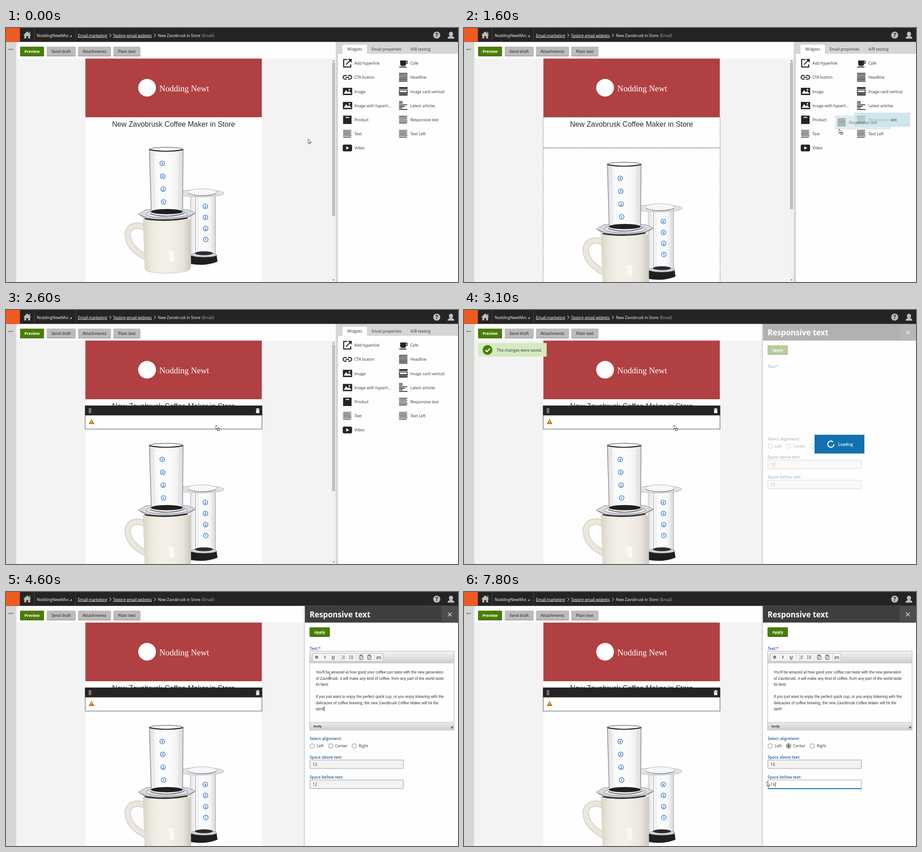
These frames come from a looping animation (998 px wide and 561 px high, 8 s). An HTML page:

```html
<!DOCTYPE html>
<html lang="en">
<head>
<meta charset="utf-8">
<title>Email builder</title>
<style>
html, body { margin: 0; width: 100%; height: 100%; overflow: hidden; background: #fff; }
svg { display: block; width: 998px; height: 561px; font-family: "Open Sans", "Noto Sans", sans-serif; }
text { white-space: pre; }
</style>
</head>
<body>
<svg id="stage" viewBox="0 0 998 561" xmlns="http://www.w3.org/2000/svg"></svg>
<script>
const LOOP = 8000, STEP = 100;
const INK = '#262423', GREEN = '#497d04', BLUE = '#1271b0', LABEL = '#1d5f96';
const PAPER = '#fefefe';
const ARIAL = "'Liberation Sans', Arial, sans-serif";
const SERIF = "'Liberation Serif', serif";

// Markup helpers
const attrs = o => Object.entries(o).map(([k, v]) => ` ${k}="${v}"`).join('');
const rect = (x, y, w, h, fill, more = {}) =>
  `<rect${attrs({ x, y, width: w, height: h, fill, ...more })}/>`;
const path = (d, fill = 'none', more = {}) => `<path${attrs({ d, fill, ...more })}/>`;
const line = (d, stroke, w = 1, more = {}) => path(d, 'none', { stroke, 'stroke-width': w, ...more });
const oval = (cx, cy, rx, ry, fill, more = {}) => `<ellipse${attrs({ cx, cy, rx, ry, fill, ...more })}/>`;
const text = (x, y, s, more = {}) =>
  `<text${attrs({ x, y, 'font-size': 8.6, fill: '#333', ...more })}>${s}</text>`;
const group = (id, ...parts) => `<g id="${id}">${parts.join('')}</g>`;
const MID = { 'text-anchor': 'middle' };
const SEMI = { 'font-weight': 600 };
const gradient = (id, stops, vertical) =>
  `<linearGradient id="${id}" x2="${vertical ? 0 : 1}" y2="${vertical ? 1 : 0}">` +
  stops.map((c, i) => `<stop offset="${i / (stops.length - 1)}" stop-color="${c}"/>`).join('') + '</linearGradient>';

const defs = '<defs>' +
  gradient('glass', ['#d3d5d8', '#f0f0f2', '#fafafa', '#fcfcfc', '#fbfbfb', '#fafafa', '#f6f6f7', '#eaebed', '#d6d8da']) +
  gradient('mug', ['#d9d4c8', '#ebe7dc', '#f2efe7', '#f3f0e9', '#f0ece4', '#e9e5db', '#cdc8bc']) +
  gradient('bar', ['#f3f3f3', '#cfcfcf'], true) +
  gradient('foot', ['#ebebeb', '#cfcfcf'], true) +
  gradient('shade', ['#dcdcdc00', '#b0b0b0']) + '</defs>';

function button(x, w, y, label, green) {
  return rect(x, y, w, 20.8, green ? '#335a00' : '#949393', { rx: 1.5 }) +
    rect(x, y, w, 19.4, green ? GREEN : '#bdbbbb', { rx: 1.5 }) +
    text(x + w / 2, y + 13.7, label, { ...MID, 'font-weight': green ? 700 : 600, fill: green ? '#fff' : '#403e3d', 'font-size': 8.5 });
}

function topBar() {
  const sep = x => rect(x, 0, 1, 30.7, '#4b4948');
  const chevron = x => line(`M${x} 12.5l3.5 3.7l-3.5 3.7`, '#b5b3b2', 1.2);
  const link = { fill: '#fff', 'text-decoration': 'underline' };
  return rect(0, 0, 998, 30.7, INK) + rect(0, 0, 30.7, 30.7, '#f05a22') + sep(62) + sep(153) +
    path('M46.8 7.5l8.7 8.2h-2.3v7.3h-4.3v-5h-4.2v5h-4.3v-7.3h-2.3zM51.5 8.5h2v4h-2z', '#bdbbbb') +
    text(68, 19.5, 'NoddingNewtMvc', { fill: '#fff', 'font-size': 8.5 }) + path('M145 15v4.5h-4.5z', '#bdbbbb') +
    text(158.7, 19.5, 'Email marketing', link) + chevron(228.5) +
    text(236.3, 19.5, 'Testing email widgets', link) + chevron(327) +
    text(335.5, 19.5, 'New Zavobrusk in Store', { fill: '#fff', 'font-size': 8.5 }) +
    text(432.5, 19.5, '(Email)', { fill: '#b5b3b2' }) +
    oval(951, 15.7, 7.8, 7.8, '#bdbbbb') +
    text(951, 20.2, '?', { ...MID, 'font-size': 12.5, 'font-weight': 700, fill: INK }) +
    oval(982.5, 13.3, 4.6, 5.3, '#bdbbbb') + path('M975 23.5q0-4.5 5-5.5h5q5 1 5 5.5z', '#bdbbbb');
}

function numbers(x0, y0, dx, dy) {
  return [4, 3, 2, 1].map((n, i) => {
    const x = x0 + dx * i, y = y0 + dy * i;
    return oval(x, y, 5.2, 5.2, '#f8fafd', { stroke: '#2d70bd', 'stroke-width': 1.3 }) +
      text(x, y + 2.7, n, { ...MID, 'font-size': 7.5, 'font-weight': 700, fill: '#2d70bd' });
  }).join('');
}

function photo() {
  const rim = { stroke: '#b0b3b8', 'stroke-width': 1 };
  const handle = 'M307 441C288 430 266 440 269 460C272 484 290 496 308 506';
  const smallPress = rect(406, 366, 57, 134, 'url(#glass)') +
    line('M418.5 372V494', '#8d9095', 1) + line('M424 372V494M457 372V494', '#d3d5d8', .9) + line('M462.5 370V500', '#9a9da2', 1) +
    path('M407 503L465 502L467 516Q440 527 407 521z', '#1f1f21') +
    oval(437, 501, 28, 5, '#d5d6d9', { stroke: '#8d9095' }) + oval(437, 497.5, 20, 4.2, '#2c2c2f') +
    oval(430, 365, 51.5, 8, '#e1e3e6', rim) + oval(433, 362.5, 32, 7.5, '#f7f7f8', rim) +
    line('M402 366Q432 375 464 366', '#85888d', 1.3) + line('M383 369Q430 378 478 368', '#c3c5c9', 1.2) +
    numbers(440, 394, .4, 24.4);
  const mug = line(handle, '#bfb9ac', 13.5) + line(handle, '#ebe7dd', 11.5) +
    path('M302 422H408L408.5 520Q409 533 399 537Q355 546 315 538Q307 535 306 525z', 'url(#mug)') +
    line('M306 527Q307 535 315 538Q355 546 399 537Q408 534 408.5 522', '#c9c3b6', 1.2) +
    path('M358 491h13v25h-9z', '#faf8f5');
  const flange = path('M292 411L310 401H400L419 409L398 421Q356 427 313 424z', '#dadbdf', { stroke: '#85878c' }) +
    oval(355, 411, 46, 8.5, '#e6e7ea', { stroke: '#77797e' }) + line('M296 413L313 420Q355 426 398 418L416 410', '#6d6f74', 1.2) +
    line('M306 421Q355 429 401 419.5', '#232326', 2.6);
  const chamber = path('M316 268L320.5 405H390L391.5 268z', 'url(#glass)') +
    line('M316.5 268L320.5 403M391 268L390 403', '#6f7176', 1.1) +
    line('M325 274L328 400M383 274L382 400', '#d6d8da', 1) +
    oval(355, 405.5, 35, 5.8, '#1f1f22') + line('M318 410Q355 422 394 409', '#55575c', 1.5) +
    oval(353.8, 268, 37.4, 4.6, '#f6f6f6', { stroke: '#3c3d40' }) + line('M316.5 268.5Q353 276 391 268.5', '#1f1f21', 2.2);
  return smallPress + mug + flange + chamber + numbers(345, 299.2, 1, 28.3);
}

const email = () =>
  rect(22, 30.7, 706, 37, PAPER) + rect(22, 67.5, 706, 494, '#f3f3f3') + rect(0, 30.7, 22, 531, '#d5d7d5') + rect(22, 30.7, 2, 531, '#e9eae9') +
  [7, 10.5, 14].map(x => rect(x - 1, 46.3, 1.9, 1.9, '#333')).join('') +
  rect(175.3, 67.5, 389.5, 494, PAPER) + rect(175.3, 67.5, 389.5, 129.6, '#b04042') +
  oval(311.5, 132, 19.6, 19.6, '#fff') +
  text(338.5, 139.5, 'Nodding Newt', { 'font-family': SERIF, 'font-size': 18.6, fill: '#fff' }) +
  text(370, 218, 'New Zavobrusk Coffee Maker in Store', { ...MID, 'font-family': ARIAL, 'font-size': 16.05, fill: '#2d2d2d' }) +
  group('photo', photo()) +
  rect(720, 67.5, 8, 494, '#f1f1f1') + path('M721 73.5l2.3-2.5l2.3 2.5z', '#555') + path('M721 555.5h4.6l-2.3 2.5z', '#555') +
  '<rect id="thumb" x="720" y="76" width="6.6" fill="#bfbfbf"/>' +
  button(31, 53, 41.6, 'Preview', true) + button(90, 63.5, 41.6, 'Send draft') +
  button(159, 72.5, 41.6, 'Attachments') + button(237, 59.5, 41.6, 'Plain text');

// Widget icons, drawn around a centre
const rows = (x, y, lens, step, w) =>
  line(lens.map((l, i) => `M${x - 9.5} ${y - (lens.length - 1) * step / 2 + i * step}h${l}`).join(''), INK, w);
const icons = {
  link: (x, y) => line(`M${x} ${y - 8}h-8.2v16.5h15.5v-6`, INK, 2.3) + line(`M${x - 3} ${y + 3}l9-9`, INK, 2.3) + path(`M${x + 1} ${y - 9.5}h8.5v8.5z`, INK),
  cta: (x, y) => line(`M${x - 1.5} ${y - 4}h-4a4 4 0 0 0 0 8h4M${x + 1.5} ${y - 4}h4a4 4 0 0 1 0 8h-4M${x - 4} ${y}h8`, INK, 2.2),
  image: (x, y) => rect(x - 10, y - 8, 20.5, 16, INK) +
    path(`M${x - 8} ${y + 5}l5-8l4 5l3-3l5 6z`, '#fff') + oval(x + 4.5, y - 3.8, 1.8, 1.8, '#fff'),
  product: (x, y) => rect(x - 9.5, y - 9, 18.7, 18.5, INK) + rect(x - 4, y - 6, 8, 2, '#fff'),
  text: (x, y) => rows(x, y, [18.5, 17, 18.5, 17, 18.5, 18.5, 17], 2.65, 1.2),
  video: (x, y) => rect(x - 10.3, y - 7.5, 20.6, 15, INK, { rx: 3 }) + path(`M${x - 2.5} ${y - 3.7}l6.5 3.7l-6.5 3.7z`, '#fff'),
  cafe: (x, y) => path(`M${x - 7} ${y - 6}h13v7q0 5-4 5h-5q-4 0-4-5zM${x - 9} ${y + 7.5}h16v2h-16z`, INK) + line(`M${x + 5} ${y - 4.5}h3.5v5h-3.5`, INK, 1.6),
  headline: (x, y) => rows(x, y, Array(7).fill(18.5), 2.9, 1.7),
  card: (x, y) => rect(x - 9.5, y - 9.5, 18.8, 4, INK) + rect(x - 8.7, y - 3.2, 17.2, 7, '#fff', { stroke: INK, 'stroke-width': 1.6 }) + rect(x - 9.5, y + 2, 18.8, 7, INK) + rect(x - 9.5, y + 5, 18.8, 1, '#fff'),
  articles: (x, y) => rows(x, y, [8, 8, 18, 12, 8, 18.5], 3.4, 1.8),
};

const widgets = [
  ['link', 'Add hyperlink', 'cafe', 'Cafe'], ['cta', 'CTA button', 'headline', 'Headline'],
  ['image', 'Image', 'card', 'Image card vertical'], ['image', 'Image with hyperli...', 'articles', 'Latest articles'],
  ['product', 'Product', 'text', 'Responsive text'], ['text', 'Text', 'text', 'Text Left'], ['video', 'Video'],
];
const widget = (x, y, icon, label) => icon ? icons[icon](x, y) + text(x + 15.4, y + 3.4, label) : '';

const sidePanel = () =>
  rect(728, 30.7, 5, 531, '#d5d7d5') + rect(733, 30.7, 265, 531, PAPER) + rect(733, 30.7, 265, 26.3, '#d5d7d5') +
  rect(743, 37, 54, 20, PAPER) + text(770, 50.3, 'Widgets', { ...MID, 'font-size': 8.8 }) +
  text(807.5, 50.3, 'Email properties') + text(893, 50.3, 'A/B testing', { 'font-size': 8.8 }) +
  rect(862, 187, 123, 31, '#cfe6ec', { id: 'hover' }) +
  widgets.map(([a, b, c, d], i) => widget(753.8, 77.7 + i * 31.2, a, b) + widget(877.3, 77.7 + i * 31.2, c, d)).join('');

const dashed = (y, h) => rect(174.8, y, 390.6, h, 'none', { stroke: '#7a7a7a', 'stroke-dasharray': '2.6 1.5' });

const dropped = () =>
  rect(174.9, 211.5, 390.3, 51.5, PAPER, { stroke: '#333', 'stroke-width': .9 }) + rect(174.5, 211, 391.1, 21.7, INK) +
  [0, 1, 2, 3].map(i => rect(183, 217.3 + i * 2.8, 1.7, 1.7, '#fff') + rect(186, 217.3 + i * 2.8, 1.7, 1.7, '#fff')).join('') +
  path('M551.7 218.3h2.5v-1.5h3.2v1.5h2.5v1.4h-8.2zM552.3 220.4h7v7.3h-7z', '#fff') +
  path('M189 240l6.3 12h-12.6z', '#c87511') + rect(188.4, 244, 1.3, 4, '#fff') + rect(188.4, 249, 1.3, 1.4, '#fff');

const toast = () => rect(31, 73, 151.5, 30, '#d5eac0') + oval(52, 88.2, 10.7, 10.7, GREEN) +
  line('M47 88.5l3.6 3.6l6.6-7', '#fff', 2.4) + text(72.5, 91.7, 'The changes were saved.');

const copy = [
  "You'll be amazed at how good your coffee can taste with the new generation",
  'of Zavobrusk. It will make any kind of coffee, from any part of the world taste',
  'its best.', '',
  'If you just want to enjoy the perfect quick cup, or you enjoy tinkering with the',
  'delicacies of coffee brewing, the new ZavoBrusk Coffee Maker will hit the', 'spot!',
];

function editorTools() {
  const letter = (x, s, more) => text(x, 147.3, s, { ...MID, 'font-size': 9, 'font-family': ARIAL, 'font-weight': 700, ...more });
  const list = x => line(`M${x} 141.5h4.5M${x} 144.3h4.5M${x} 147h4.5`, '#444', 1);
  const clip = x => rect(x - 3.8, 139.7, 7.6, 9, 'none', { stroke: '#444', rx: .8 }) + rect(x - 2, 138.5, 4, 2.2, '#444') +
    rect(x - .8, 143, 5, 5.5, '#fff', { stroke: '#444', 'stroke-width': .9 });
  return rect(676.5, 135.5, 156, 17.5, '#f4f4f4', { stroke: '#b5b5b5', rx: 1.5 }) +
    letter(686, 'B') + letter(704, 'I', { 'font-style': 'italic', 'font-family': SERIF }) + letter(722.5, 'U', { 'text-decoration': 'underline' }) +
    [733, 773, 813].map(x => rect(x, 138, .8, 12.5, '#c4c4c4')).join('') +
    text(739.8, 143, '1', { 'font-size': 4.5 }) + text(739.8, 148.5, '2', { 'font-size': 4.5 }) + list(743.5) +
    rect(758, 140.5, 2.2, 2.2, '#444') + rect(758, 145.5, 2.2, 2.2, '#444') + list(762) +
    clip(784) + clip(802) + letter(823, '{#}', { 'font-size': 8 });
}

const editor = () => rect(670.5, 130.5, 319, 174.5, PAPER, { stroke: '#b6b6b6' }) +
  rect(671, 131, 318, 26, 'url(#bar)') + rect(671, 156.5, 318, .8, '#b6b6b6') +
  rect(671, 288, 318, 17, 'url(#foot)') + rect(671, 287.5, 318, .8, '#b6b6b6') + path('M987 295v6h-6z', '#666') +
  group('tools', editorTools()) +
  group('copy', copy.map((s, i) => text(684, 180.3 + i * 13.5, s, { 'font-family': ARIAL, 'font-size': 8.4 })).join(''),
    text(679, 299, 'body', { 'font-family': ARIAL, 'font-size': 7.5, 'font-weight': 700 })) +
  rect(702, 253, 1, 10, '#000', { id: 'caret' });

const label = (y, s) => text(670.5, y, s, { ...SEMI, fill: LABEL });
const radio = (x, s) => oval(x, 340, 4.9, 4.9, '#fff', { stroke: '#8e8e8e', 'stroke-width': 1.1 }) + text(x + 10, 343.3, s);
const field = (i, y) => group('field' + i,
  rect(671, y, 206.5, 18.8, '#f2f2f2', { class: 'box', stroke: '#bdbbbb', 'stroke-width': 1.6, rx: 1 }),
  rect(671, y + 18, 206.8, 2, BLUE, { class: 'focus' }), rect(677, y + 4, 10.3, 11.5, '#2f7fd6', { class: 'selection' }),
  text(677, y + 13, '12', { class: 'value' }), rect(687.5, y + 4.5, .9, 10.5, '#111', { class: 'caret' }));

const form = () => rect(655, 30.7, 5, 531, 'url(#shade)', { opacity: .6 }) + rect(660, 30.7, 338, 531, PAPER) +
  rect(660, 30.7, 338, 36.8, '#3f3d3d') + rect(961.5, 30.7, 36.5, 36.8, '#4d4b4b') +
  text(670.3, 56.3, 'Responsive text', { 'font-weight': 700, 'font-size': 17, fill: '#fff' }) +
  line('M975.8 45.3l8.4 8.4m0-8.4l-8.4 8.4', '#d8d8d8', 1.5) +
  button(670.5, 44.5, 78.1, 'Apply', true) + label(128.2, 'Text:<tspan fill="#c8202f">*</tspan>') +
  group('editor', editor()) +
  group('fields', label(327.2, 'Select alignment:'), radio(676, 'Left'), radio(716.8, 'Center'), radio(769, 'Right'),
    group('checked', oval(716.8, 340, 2.9, 2.9, GREEN), oval(716.8, 340, 5, 5, 'none', { id: 'ring', 'stroke-width': 1.3 })),
    label(367.7, 'Space above text:'), field(1, 371), label(411.8, 'Space bellow text:'), field(2, 415.3)) +
  group('loading', rect(660, 30.7, 338, 531, '#fff', { opacity: .6 }), rect(774, 275.5, 110, 41.5, BLUE),
    `<g id="spinner">${line('M4.8 -4.8A6.8 6.8 0 1 0 6.8 0', '#fff', 2.3)}</g>`,
    text(826, 299.8, 'Loading', { ...SEMI, fill: '#fff' }));

const arrow = path('M0 0V10L2.3 7.8L3.8 11.2L5.2 10.6L3.8 7.3H7z', '#fff', { stroke: '#222', 'stroke-width': .8 });
const cursors = group('cursor',
  group('arrow', arrow),
  group('dragging', arrow, rect(3, 8, 5.2, 4, '#fff', { stroke: '#222', 'stroke-width': .9 })),
  group('denied', oval(0, 0, 4, 4, '#fff', { stroke: '#000', 'stroke-width': 1.5 }), line('M-2.8 -2.8L2.8 2.8', '#000', 1.5)),
  group('beam', line('M-1.6 -4.5h3.2M0 -4.5V4.5M-1.6 4.5h3.2', '#333', .8)));

const stage = document.getElementById('stage');
stage.innerHTML = defs + email() +
  group('zones', dashed(197, 67.3), dashed(265.3, 310)) + group('dropped', dropped()) + sidePanel() +
  `<g id="ghost" opacity=".68">${rect(0, 0, 123, 31, '#cfe6ec')}${widget(15.3, 15.2, 'text', 'Responsive text')}</g>` +
  group('form', form()) + group('toast', toast()) + topBar() + cursors;

const $ = id => document.getElementById(id);
const show = (id, on) => $(id).setAttribute('display', on ? 'inline' : 'none');
const move = (id, x, y) => $(id).setAttribute('transform', `translate(${x} ${y})`);
const between = (v, a, b) => v >= a && v < b;
const ramp = (t, a, b) => Math.min(1, Math.max(0, (t - a) / (b - a)));
const ease = p => p * p * (3 - 2 * p);

// Pointer route: time, x, y, eased
const route = [
  [0, 667, 245], [400, 667, 245], [1000, 871, 216, 1], [1400, 871, 216], [1600, 828, 223], [2100, 594, 247],
  [2300, 500, 253], [2500, 463.5, 254], [3700, 463.5, 254], [4300, 715, 185, 1], [5400, 715, 185], [6300, 725, 346, 1],
  [6600, 698, 380], [6700, 695, 381], [6900, 669, 381], [7000, 669, 381], [7200, 688, 418], [7500, 688, 418], [7700, 669, 419], [8000, 669, 419],
];
function pointer(t) {
  const i = route.findIndex(k => k[0] > t);
  const [t0, x0, y0] = route[i - 1], [t1, x1, y1, soft] = route[i];
  const p = ramp(t, t0, t1), q = soft ? ease(p) : p;
  return [x0 + (x1 - x0) * q, y0 + (y1 - y0) * q];
}

function setField(i, value, focus, selected) {
  const part = c => $('field' + i).querySelector('.' + c);
  const vis = (c, on) => part(c).setAttribute('display', on ? 'inline' : 'none');
  part('box').setAttribute('fill', focus ? '#fff' : '#f2f2f2');
  part('value').textContent = value;
  part('value').setAttribute('fill', selected ? '#fff' : '#333');
  vis('focus', focus);
  vis('selection', selected);
  vis('caret', focus && value === '16');
}

function render(t) {
  const [x, y] = pointer(t);
  const drag = between(t, 1500, 2500), placed = t >= 2500;
  move('photo', 0, drag ? 33 : placed ? 31 : 0);
  $('thumb').setAttribute('height', t < 1500 ? 339 : 324);
  show('zones', drag);
  show('dropped', placed);
  show('hover', between(t, 900, 2500));
  show('ghost', drag);
  const lag = ramp(t, 1600, 2000);
  move('ghost', x - 9 + 22 * lag, y - 30 - 2 * lag);

  show('form', t >= 2700);
  move('form', 338 * (1 - ease(ramp(t, 2600, 2900))), 0);
  show('loading', t < 3200);
  $('spinner').setAttribute('transform', `translate(810 296.3) rotate(${(t - 3100) * .36})`);
  show('editor', t >= 3300);
  show('tools', t >= 3400);
  move('fields', 0, t < 3300 ? -39.5 : 0);
  show('copy', t >= 4600);
  show('caret', between(t, 4600, 5000) || between(t, 5500, 6000));
  show('checked', t >= 6300);
  $('ring').setAttribute('stroke', t < 6700 ? BLUE : '#777');
  setField(1, t < 7200 ? '12' : t < 7300 ? '1' : '16', between(t, 6700, 7600), between(t, 6800, 7200));
  setField(2, t < 7800 ? '12' : '16', t >= 7600, between(t, 7700, 7800));

  show('toast', between(t, 3000, 4200));
  $('toast').setAttribute('opacity', 1 - ramp(t, 3700, 4200));

  const typing = t >= 3800 && x > 671 && (between(y, 157, 288) || between(y, 371, 390) || between(y, 415, 434));
  const kind = between(t, 1500, 3800) ? (drag && between(x, 566, 733) ? 'denied' : 'dragging') : typing ? 'beam' : 'arrow';
  for (const id of ['arrow', 'dragging', 'denied', 'beam']) show(id, id === kind);
  move('cursor', x, y);
}

const start = performance.now();
function tick() {
  const t = (performance.now() - start) % LOOP;
  render(Math.floor(t / STEP) * STEP);
  requestAnimationFrame(tick);
}
tick();
</script>
</body>
</html>
```
